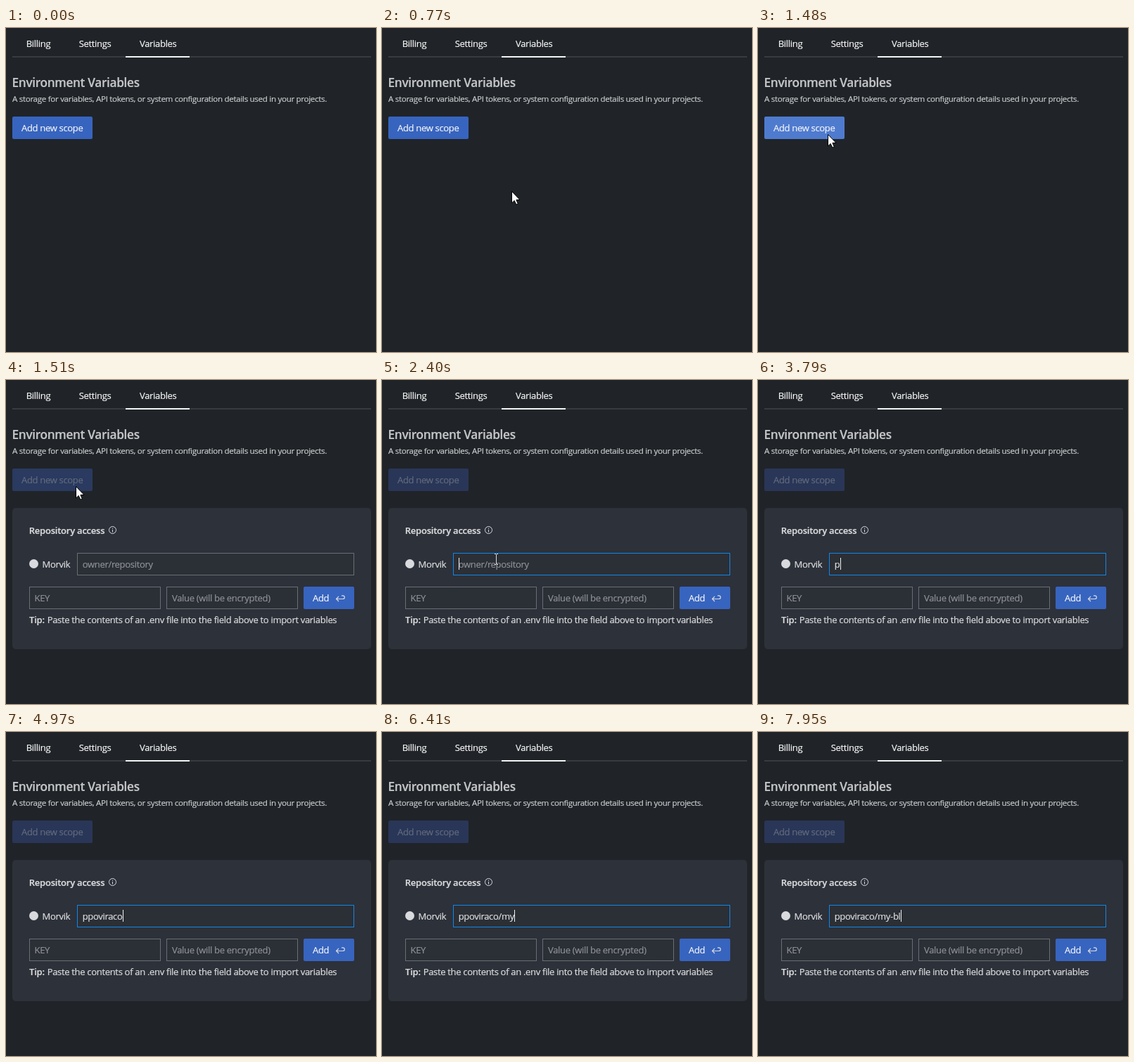
These frames come from a looping animation (526 by 461 pixels, 8 s). An HTML page:

```html
<!DOCTYPE html>
<html lang="en">
<head>
<meta charset="utf-8">
<title>Environment Variables</title>
<style>
  html, body { margin: 0; width: 100%; height: 100%; overflow: hidden; background: #202428; }
  svg { display: block; width: 100%; height: 100%; }
  text {
    font: 13px "Open Sans", "Noto Sans", sans-serif; letter-spacing: -.31px; white-space: pre;
    color: #dcddde; fill: currentColor; stroke: currentColor; stroke-width: .2px;
  }
  .tab { color: #f4f4f4; }
  .title { font-size: 17.2px; font-weight: 600; color: #c6c7c9; }
  .note { font-size: 11.6px; color: #c9cacc; }
  .strong { font-weight: 600; letter-spacing: -.22px; }
  .label { color: #f2f4f8; }
  .hint { color: #8e9197; }
  .input { fill: #2b2f36; stroke: #696d74; }
  .line { fill: none; stroke: #d8dade; }
</style>
</head>
<body>
<svg viewBox="0 0 526 461">
  <rect width="526" height="461" fill="#202428"/>

  <rect x="9" y="40" width="510" height="2" fill="#383c40"/>
  <rect x="170" y="40" width="91" height="2" fill="#f4f4f4"/>
  <text class="tab" x="28.7" y="27">Billing</text>
  <text class="tab" x="103.7" y="27">Settings</text>
  <text class="tab" x="190" y="27">Variables</text>

  <text class="title" x="8.5" y="84">Environment Variables</text>
  <text class="note" x="9" y="105">A storage for variables, API tokens, or system configuration details used in your projects.</text>

  <rect id="scopeButton" x="9" y="126" width="114" height="32" rx="2"/>
  <text id="scopeLabel" class="label" x="22" y="147">Add new scope</text>

  <g id="panel">
    <rect x="9" y="182" width="510" height="201" rx="5" fill="#2d313a"/>
    <text class="strong" x="32.7" y="219">Repository access</text>
    <circle class="line" cx="151.5" cy="213.5" r="5"/>
    <path class="line" d="M151.5 213v3.5M151.5 210.7v1.2"/>

    <circle cx="39.5" cy="261.5" r="6.5" fill="#d8dade"/>
    <text x="51.5" y="267">Morvik</text>
    <rect id="repoInput" class="input" x="101.5" y="246.5" width="393" height="31"/>
    <text id="repoHint" class="hint" x="108.7" y="267">owner/repository</text>
    <text id="repoText" x="108.7" y="267"></text>
    <rect id="caret" y="253" width="1" height="17" fill="#f0f0f0"/>

    <rect class="input" x="33.5" y="294.5" width="186" height="31"/>
    <text class="hint" x="40.5" y="315">KEY</text>
    <rect class="input" x="228.5" y="294.5" width="186" height="31"/>
    <text class="hint" x="236" y="315">Value (will be encrypted)</text>
    <rect x="423" y="294" width="72" height="32" rx="2" fill="#3764be"/>
    <text class="label" x="436" y="315">Add</text>
    <path class="line" stroke-width="1.2" d="M473 308l-3.5 3.5l3.5 3.5M469.5 311.5H479a2.3 2.3 0 0 0 0-4.6h-2"/>

    <text class="strong" x="33" y="346">Tip:</text>
    <text x="58.7" y="346">Paste the contents of an .env file into the field above to import variables</text>
  </g>

  <path id="arrow" d="M.5 .5V17L4.2 13.5L6.8 19.2L9.3 18.1L6.9 12.5H12Z" fill="#fff" stroke="#000"/>
  <path id="beam" class="line" d="M-2.5 -7.5H-.5M.5 -7.5H2.5M-2.5 7.5H-.5M.5 7.5H2.5M0 -7V7"/>
</svg>
<script>
const LOOP = 8000, PRESS = 1480, OPEN = 1510, FOCUS = 2400, BLINK = 525;
const TYPED = "ppoviraco/my-bl";
const KEY_TIMES = [3790, 3990, 4190, 4310, 4480, 4600, 4740, 4900, 4970,
                   5840, 6130, 6410, 7350, 7840, 7950];

const el = Object.fromEntries([...document.querySelectorAll("[id]")].map(e => [e.id, e]));
const show = (node, on) => node.style.display = on ? "" : "none";
const progress = (t, from, to) => Math.min(1, Math.max(0, (t - from) / (to - from)));
const smooth = p => p * p * (3 - 2 * p);
const bezier = (a, b, c, p) =>
  a.map((v, i) => v * (1 - p) ** 2 + 2 * b[i] * p * (1 - p) + c[i] * p * p);

const ENTRY = [392, 446], BUTTON = [99, 151], FIELD = [163, 255], EXIT = [501, 318];

function pointerAt(t) {
  if (t < 440 || t >= 2900) return null;
  if (t < 1850) {
    const p = 1 - (1 - progress(t, 440, 1150)) ** 2;
    return bezier(ENTRY, [250, 290], BUTTON, p);
  }
  if (t < 2630) return bezier(BUTTON, [131, 203], FIELD, smooth(progress(t, 1820, 2150)));
  return bezier(FIELD, [330, 225], EXIT, progress(t, 2600, 2890));
}

const inside = ([x, y], left, top, right, bottom) =>
  x >= left && x <= right && y >= top && y <= bottom;

function drawPointer(t) {
  const pos = pointerAt(t);
  const overText = pos && t >= OPEN &&
    (inside(pos, 101, 246, 495, 278) || inside(pos, 228, 294, 415, 326));
  show(el.arrow, pos && !overText);
  show(el.beam, overText);
  if (pos) {
    const [x, y] = pos.map(Math.round);
    el.arrow.setAttribute("transform", `translate(${x} ${y})`);
    el.beam.setAttribute("transform", `translate(${x - .5} ${y})`);
  }
}

function drawButton(t) {
  el.scopeButton.style.fill =
    t < PRESS ? "#3764be" : t < OPEN ? "#4f7bcf" : t < OPEN + 30 ? "#2a3a60" : "#293658";
  el.scopeLabel.style.color = t < OPEN ? "#f2f4f8" : "#626a7c";
}

function drawField(t) {
  const count = KEY_TIMES.filter(k => k <= t).length;
  const lastInput = count ? KEY_TIMES[count - 1] : FOCUS;
  el.repoText.textContent = TYPED.slice(0, count);
  show(el.repoHint, !count);
  el.repoInput.style.stroke = t >= FOCUS ? "#0f87e8" : "";
  show(el.caret, t >= FOCUS && Math.floor((t - lastInput) / BLINK) % 2 === 0);
  const width = count ? el.repoText.getComputedTextLength() : 0;
  el.caret.setAttribute("x", 109 + Math.round(width));
}

function frame() {
  const t = performance.now() % LOOP;
  show(el.panel, t >= OPEN);
  drawButton(t);
  drawField(t);
  drawPointer(t);
  requestAnimationFrame(frame);
}
frame();
</script>
</body>
</html>
```
